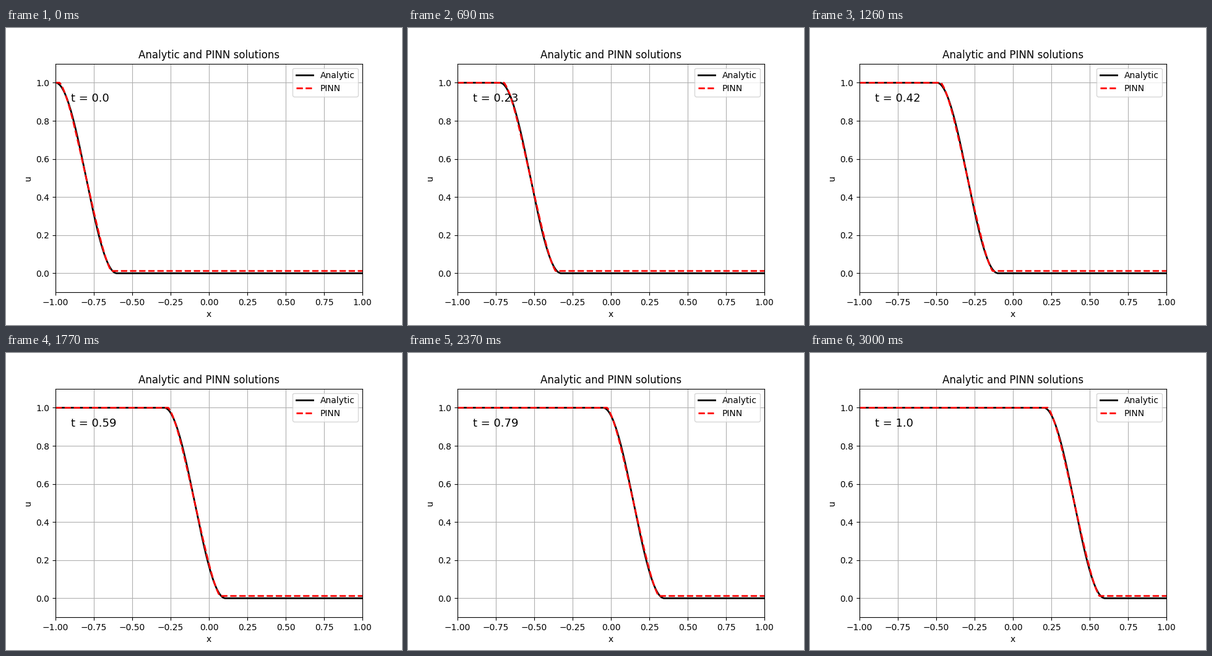
These frames come from a looping animation (640x480 px, 3030 ms). A matplotlib script:

```python
import numpy as np
import matplotlib.pyplot as plt
from matplotlib.animation import FuncAnimation

STEPS = 100
SPEED = 1.2
WIDTH = 0.4
FLOOR = 0.012    # residual level of the network ahead of the front
RIPPLE = 0.014   # third-harmonic error of the network

x = np.linspace(-1, 1, 1001)


def phase(t):
    return np.pi * np.clip((x + 1 - SPEED * t) / WIDTH, 0, 1)


def analytic(t):
    return 0.5 * (1 + np.cos(phase(t)))


def network(t):
    return np.clip(analytic(t) + RIPPLE * np.cos(3 * phase(t)), FLOOR, 1)


fig, ax = plt.subplots(figsize=(6.4, 4.8), dpi=100)
# A hair left of the default, so centred labels round to the left pixel
fig.subplots_adjust(left=0.12499, right=0.89999)

exact_line, = ax.plot(x, analytic(0), "k-", lw=2, label="Analytic")
net_line, = ax.plot(x, network(0), "r--", lw=2, label="PINN")
clock = ax.text(-0.9, 0.9, "t = 0.0", fontsize=13)

ax.set_xlim(-1, 1)
ax.set_ylim(-0.1, 1.1)
ax.set_xlabel("x")
ax.set_ylabel("u")
ax.set_title("Analytic and PINN solutions")
ax.grid(True)
ax.legend(loc="upper right")


def update(i):
    t = i / STEPS
    exact_line.set_ydata(analytic(t))
    net_line.set_ydata(network(t))
    clock.set_text(f"t = {t}")
    return exact_line, net_line, clock


anim = FuncAnimation(fig, update, frames=STEPS + 1, interval=30,
                     repeat=True, repeat_delay=0)
plt.show()
```
